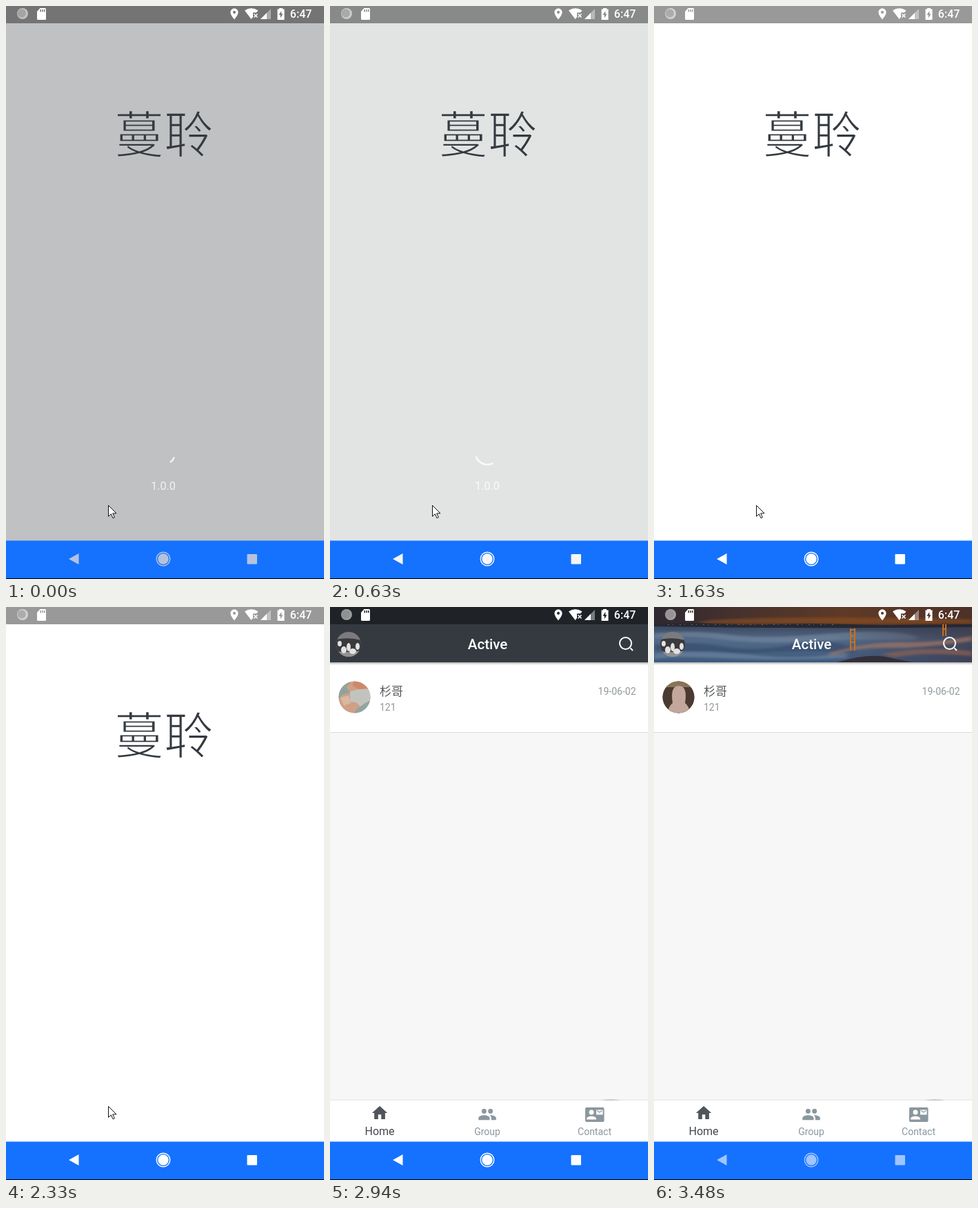
An HTML page that plays this animation: 461x829 px, repeating every 3.94 s.

```html
<!DOCTYPE html>
<html lang="en">
<head>
<meta charset="utf-8">
<title>App launch</title>
<style>
html, body { margin: 0; width: 100%; height: 100%; overflow: hidden; background: #fff; }
svg { display: block; width: 100%; height: 100%; }
text { font-family: Roboto, "Noto Sans CJK SC", "Noto Sans CJK", sans-serif; font-size: 14px; }
.mid { text-anchor: middle; }
.tab { fill: #8a979e; }
/* a background-coloured outline thins the strokes */
.logo { font: 300 72px "Noto Sans CJK SC", "Noto Sans CJK", sans-serif; fill: #343a40; stroke: currentColor; stroke-width: 1.7px; }
</style>
</head>
<body>
<svg viewBox="0 0 461 829" preserveAspectRatio="none">
  <defs>
    <linearGradient id="sky">
      <stop offset="0" stop-color="#2f2830"/>
      <stop offset=".25" stop-color="#45312d"/>
      <stop offset=".6" stop-color="#5f3a26"/>
      <stop offset="1" stop-color="#4d3128"/>
    </linearGradient>
    <linearGradient id="sea" x2="0" y2="1">
      <stop offset="0" stop-color="#3a465c"/>
      <stop offset=".4" stop-color="#526a88"/>
      <stop offset="1" stop-color="#3f5a7c"/>
    </linearGradient>
    <linearGradient id="dusk">
      <stop offset=".55" stop-color="#3b3442" stop-opacity="0"/>
      <stop offset="1" stop-color="#3b3442" stop-opacity=".65"/>
    </linearGradient>
    <linearGradient id="drop" x2="0" y2="1">
      <stop offset="0" stop-opacity=".3"/>
      <stop offset="1" stop-opacity="0"/>
    </linearGradient>
    <filter id="soft"><feGaussianBlur stdDeviation="3 1.5"/></filter>
    <clipPath id="bar"><rect width="461" height="80"/></clipPath>
    <clipPath id="small"><circle cx="27" cy="54" r="18"/></clipPath>
    <clipPath id="large"><circle cx="35.5" cy="130.5" r="23"/></clipPath>
  </defs>

  <g id="splash">
    <rect width="461" height="829" fill="currentColor"/>
    <rect width="461" height="25" opacity=".4"/>
    <text class="mid logo" x="229" y="212">蔓聆</text>
    <g id="loading">
      <path id="arc" fill="none" stroke="#fff" stroke-width="2.5" opacity=".8"/>
      <text class="mid" x="228" y="700" fill="#fff" opacity=".8" style="font-size:16.2px">1.0.0</text>
    </g>
    <path id="cursor" d="M148.5 722.5v16l3.8-3.6 2.7 6 2.4-1.1-2.7-5.8h5.3z" fill="#fff" stroke="#111"/>
  </g>

  <g id="home">
    <rect width="461" height="829" fill="#f7f7f7"/>
    <rect y="80" width="461" height="101" fill="#fff"/>
    <path d="M0 181.5H461" stroke="#d9d9d9"/>
    <rect y="80" width="461" height="4" fill="url(#drop)"/>
    <rect width="461" height="80" fill="#343a40"/>
    <rect width="461" height="25" opacity=".4"/>

    <g id="photo" clip-path="url(#bar)">
      <rect width="461" height="26" fill="url(#sky)"/>
      <rect y="26" width="461" height="54" fill="url(#sea)"/>
      <g filter="url(#soft)">
        <path d="M80 19Q200 12 461 18V24H60Z" fill="#8f4f22" opacity=".6"/>
        <path d="M0 38Q60 33 110 40T250 39T380 42V48Q280 46 220 50T100 47T0 46Z" fill="#6f839c" opacity=".7"/>
        <path d="M0 55Q50 48 100 57T200 54T290 60V66Q220 62 160 66T0 62Z" fill="#33496a" opacity=".6"/>
        <path d="M0 67Q70 61 140 69T280 66V74Q180 78 100 74T0 76Z" fill="#6c84a2" opacity=".7"/>
      </g>
      <rect y="26" width="461" height="54" fill="url(#dusk)"/>
      <g filter="url(#soft)">
        <path d="M255 66Q310 50 360 51T461 42V49Q390 60 340 59T255 72Z" fill="#a87866" opacity=".65"/>
        <path d="M330 68Q390 56 461 64V71Q390 64 350 73Z" fill="#8d6153" opacity=".7"/>
      </g>
      <path d="M0 28V24L60 23 130 25.500 230 24 330 26 461 25V29Q230 32 0 28Z" fill="#252833"/>
      <path d="M20 25.500H260" stroke="#a98b78" stroke-dasharray="2 5 1 9" opacity=".6"/>
      <path d="M265 80Q315 65 345 74L375 80Z" fill="#332f39"/>
      <path d="M285 31V63M291 31V63M284 33H292M284 42H292M284 51H292M419 25V42M423 25V42M418 32H424"
        stroke="#c5701f" stroke-width="2" fill="none"/>
    </g>

    <g clip-path="url(#small)">
      <rect x="9" y="36" width="36" height="36" fill="#7b7b7f"/>
      <path d="M9 47Q27 43 45 48V65H9Z" fill="#3a3a3d"/>
      <path d="M9 64Q27 67 45 63V72H9Z" fill="#929295"/>
      <g fill="#e2e2e2">
        <ellipse cx="14" cy="53" rx="3" ry="4"/>
        <ellipse cx="20" cy="62" rx="4" ry="5"/>
        <ellipse cx="27" cy="58" rx="3" ry="6"/>
        <ellipse cx="33" cy="64" rx="5" ry="4"/>
        <ellipse cx="40" cy="57" rx="3" ry="5"/>
      </g>
    </g>
    <text class="mid" x="228.500" y="61" fill="#fff" style="font-size:20.5px;font-weight:500">Active</text>
    <g fill="none" stroke="#fff" stroke-width="2">
      <circle cx="428.500" cy="52.500" r="8.500"/>
      <path d="M435.500 59.500l3.500 3.500"/>
    </g>

    <g clip-path="url(#large)">
      <rect x="12" y="107" width="47" height="47" fill="#cf9f86"/>
      <path d="M12 107H31L24 116 29 124 18 127 12 133Z" fill="#8fa39d"/>
      <path d="M29 122L42 119 59 116V138L46 146 38 138 29 137Z" fill="#c3c3bd"/>
      <path d="M34 107H59V118L42 119 33 114Z" fill="#cd8a6b"/>
      <path d="M15 131L27 128 30 139 20 143Z" fill="#d9b8a2"/>
      <path d="M38 148L51 139 59 135V154H35Z" fill="#93a5a0"/>
    </g>
    <g id="avatar" clip-path="url(#large)">
      <rect x="12" y="107" width="47" height="47" fill="#4b3a31"/>
      <path d="M12 107H59V116H12Z" fill="#8a7458"/>
      <path d="M20 154Q21 143 27 139Q23 114 36 114T45 139Q51 143 52 154Z" fill="#c3a79c"/>
    </g>
    <text x="72" y="128" fill="#55595c" style="font-size:17px">杉哥</text>
    <text x="72" y="150" fill="#92989c">121</text>
    <text x="443.500" y="127" fill="#92989c" text-anchor="end">19-06-02</text>

    <path d="M392 714Q407 710.500 422 714Z" fill="#ccc"/>
    <rect y="712" width="461" height="2" opacity=".04"/>
    <rect y="714" width="461" height="60" fill="#fff"/>
    <path d="M10 20v-6h4v6h5v-8h3L12 3 2 12h3v8z" transform="translate(58.6 718.6) scale(1.12)" fill="#50555b"/>
    <text class="mid" x="72" y="764" fill="#43484d" style="font-size:16px">Home</text>
    <g class="tab">
      <path transform="translate(214.1 720.2) scale(1.16)" d="M16 11a3 3 0 1 0 0-6a3 3 0 1 0 0 6zM8 11a3 3 0 1 0 0-6a3 3 0 1 0 0 6zM8 13c-2.330 0-7 1.170-7 3.500V19h14v-2.500C15 14.170 10.330 13 8 13zM16 13l-1 .05c1.160.840 2 1.970 2 3.450V19h6v-2.500C23 14.170 18.330 13 16 13z"/>
      <rect x="370" y="724" width="27.500" height="21" rx="2"/>
      <g fill="#fff">
        <circle cx="379" cy="731" r="3.500"/>
        <path d="M372 741.500v-1c0-5 14-5 14 0v1zM386 727.500h9.500v7H386z"/>
      </g>
      <path d="M387 728.500l3.700 2.500 3.700-2.500" fill="none" stroke="#8a979e" stroke-width="1.200"/>
      <text class="mid" x="228" y="764">Group</text>
      <text class="mid" x="383.500" y="764">Contact</text>
    </g>
  </g>

  <g id="status" fill="currentColor" fill-rule="evenodd">
    <circle cx="24" cy="11" r="8" opacity=".55"/>
    <circle cx="22.800" cy="10.500" r="6" fill="#888" opacity=".5"/>
    <path d="M49.500 3H56.500Q58 3 58 4.500V18.500Q58 20 56.500 20H46.500Q45 20 45 18.500V8ZM49.500 5V8.500H51V5ZM52.300 5V8.500H53.800V5ZM55 5V8.500H56.500V5Z"/>
    <path transform="translate(321.400 1.900) scale(.8)" d="M12 2C8.130 2 5 5.130 5 9c0 5.250 7 13 7 13s7-7.750 7-13c0-3.870-3.130-7-7-7zM12 11.500a2.500 2.500 0 1 1 0-5a2.500 2.500 0 1 1 0 5z"/>
    <path d="M346 6.500Q355.500 0 365.500 6.500L363 9.500H358V16L355.500 19Z"/>
    <path d="M359.500 11.500l5 5m0-5l-5 5" stroke="currentColor" stroke-width="1.600"/>
    <path d="M369 19H384V4Z" opacity=".4"/>
    <path d="M369 19H378V10Z"/>
    <path d="M396 3H401V4.500H403.500V20H393.500V4.500H396ZM399.300 7L395.500 13H397.800V17.500L401.500 11.500H399.300Z"/>
    <text x="411.800" y="17.300" style="font-size:16px;font-weight:500">6:47</text>
  </g>

  <rect y="773.500" width="461" height="54.500" fill="#1472ff"/>
  <rect y="828" width="461" height="1"/>
  <g id="nav" fill="currentColor">
    <path d="M91 800L105.500 792V808Z"/>
    <circle cx="228" cy="800" r="7.700"/>
    <circle cx="228" cy="800" r="9.800" fill="none" stroke="currentColor" stroke-width="1.400"/>
    <rect x="349.500" y="793" width="14.500" height="14.500" rx="1"/>
  </g>
</svg>
<script>
const LOOP = 3940, HOME = 2940, PHOTO = 3020;
const el = id => document.getElementById(id);

// Linear interpolation between [time, value...] keys
function at(t, keys) {
  let i = 1;
  while (i < keys.length - 1 && t > keys[i][0]) i++;
  const [t0, ...a] = keys[i - 1], [t1, ...b] = keys[i];
  const k = Math.min(1, Math.max(0, (t - t0) / (t1 - t0)));
  return a.map((v, j) => v + (b[j] - v) * k);
}
const show = (id, on) => el(id).style.display = on ? "" : "none";
const fade = (id, v) => el(id).style.opacity = v;
const tint = (id, c) => el(id).style.color = `rgb(${c.map(Math.round)})`;

function arc(from, to) {
  const point = deg => {
    const a = deg * Math.PI / 180;
    return `${228 + 17 * Math.cos(a)} ${647 + 16.5 * Math.sin(a)}`;
  };
  return `M${point(from)}A17 16.5 0 ${to - from > 180 ? 1 : 0} 1 ${point(to)}`;
}

const backdrop = [[60, 192, 193, 195], [540, 223, 225, 224], [630, 226, 228, 227], [1540, 254, 254, 254], [1630, 255, 255, 255]];
const buttons = [[60, 180, 195, 221], [630, 244, 246, 249], [1540, 255, 255, 255], [HOME, 255, 255, 255], [PHOTO, 160, 196, 255]];
const spin = [[60, 20, 54], [630, 61, 163], [1630, 240, 500]];
const icons = [[3150, 82, 68, 66], [3250, 190, 186, 185], [3480, 255, 255, 255]];

function draw(now) {
  const t = now % LOOP;
  show("splash", t < HOME);
  show("home", t >= HOME);
  show("photo", t >= PHOTO);
  show("loading", t < 1630);
  tint("splash", at(t, backdrop));
  tint("nav", at(t, buttons));
  tint("status", t < PHOTO ? [255, 255, 255] : at(t, icons));
  el("arc").setAttribute("d", arc(...at(t, spin)));
  fade("cursor", at(t, [[2330, 1], [2790, 0]]));
  fade("avatar", at(t, [[3150, 0], [3250, 1]]));
  requestAnimationFrame(draw);
}
draw(performance.now());
</script>
</body>
</html>
```
